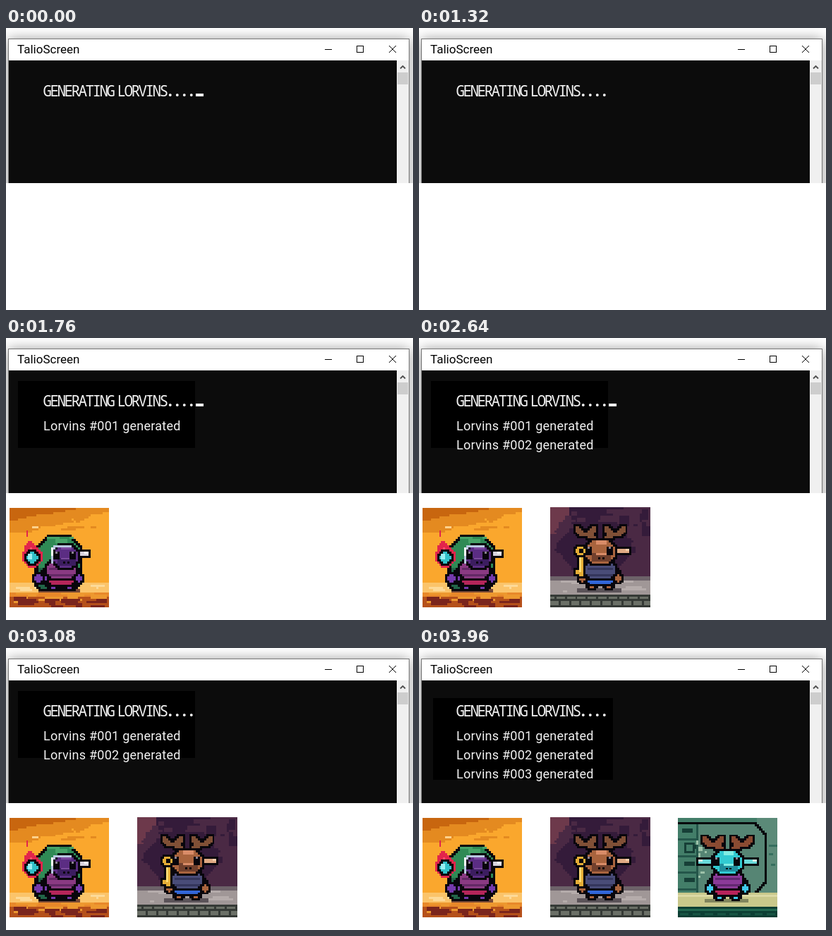
Animation, 577 px wide and 400 px high, one loop 4400 ms. Source, as an HTML page with a canvas:

```html
<!DOCTYPE html>
<html lang="en">
<head>
<meta charset="utf-8">
<title>Generator window</title>
<style>
  html, body { margin: 0; width: 100%; height: 100%; overflow: hidden; background: #fff; }
  #stage { position: relative; width: 577px; height: 400px; overflow: hidden; }
  #view { position: absolute; inset: 0 0 180px 0; overflow: hidden; }
  #win { position: absolute; left: 3px; top: 15px; width: 567px; height: 260px;
         border: 1px solid #777; background: #fff; box-shadow: 0 1px 17px rgba(0,0,0,.42); }
  svg { position: absolute; left: 0; top: 0; }
  canvas { position: absolute; top: 241px; width: 141px; height: 141px; image-rendering: pixelated; }
  #desert { left: 5px; }
  #cave { left: 186px; top: 240px; width: 142px; height: 142px; }
  #lab { left: 367px; }
  text { font-family: Roboto, "Liberation Sans", sans-serif; white-space: pre; }
  .head { font: 21px "Noto Sans Mono", "DejaVu Sans Mono", monospace;
          letter-spacing: -2.6px; word-spacing: -5px; }
  .dots { font-weight: 700; }
  .line { font-size: 18px; letter-spacing: .25px; }
  .off { visibility: hidden; }
</style>
</head>
<body>
<div id="stage">
  <div id="view">
    <div id="win"></div>
    <svg width="577" height="220" viewBox="0 0 577 220">
      <text x="16" y="36" font-size="17">TalioScreen</text>
      <path d="M452 30.5h10M497.5 25.5h9v9h-9z" fill="none" stroke="#000" shape-rendering="crispEdges"/>
      <path d="M543 25l10 10M553 25l-10 10" stroke="#000"/>
      <rect x="4" y="46" width="550" height="174" fill="#0c0c0c"/>
      <rect x="554" y="46" width="17" height="174" fill="#f0f0f0"/>
      <rect x="555" y="63" width="15" height="17" fill="#cdcdcd"/>
      <path d="M559 57.5l3.5-3.5 3.5 3.5" fill="none" stroke="#505050" stroke-width="1.8"/>
      <rect data-on="4-7" x="17" y="61" width="251" height="95"/>
      <path data-on="8-8" d="M17 61h251v42h2v88H12v-88h5z"/>
      <rect data-on="9-9" x="20" y="71" width="255" height="116"/>
      <g fill="#f2f2f2">
        <text class="head" x="52.5" y="97">GENERATING LORVINS</text>
        <text class="head dots" x="226.5" y="97">....</text>
        <text class="line" data-on="4-9" x="53" y="131">Lorvins #001 generated</text>
        <text class="line" data-on="6-9" x="53" y="158">Lorvins #002 generated</text>
        <text class="line" data-on="8-9" x="53" y="185">Lorvins #003 generated</text>
        <rect id="cursor" x="269" y="93" width="11" height="4" fill="#fff"/>
      </g>
    </svg>
  </div>
  <canvas id="desert" data-on="4-9"></canvas>
  <canvas id="cave" data-on="6-9"></canvas>
  <canvas id="lab" data-on="8-9"></canvas>
</div>
<script>
const INK = '#08060c', SIZE = 48;
const SIDES = [-1, 1];

function painter(id, seed) {
  const canvas = document.getElementById(id);
  canvas.width = canvas.height = SIZE;
  const g = canvas.getContext('2d');
  const rnd = n => (seed = seed * 16807 % 2147483647) / 2147483647 * n;

  const box = (color, x, y, w, h) => {
    g.fillStyle = color;
    g.fillRect(Math.round(x), Math.round(y), Math.round(w), Math.round(h));
  };
  const band = (color, y, h) => box(color, 0, y, SIZE, h);
  const round = (color, x, y, w, h, r) => {
    for (let i = 0; i < h; i++) {
      const cut = Math.max(0, r - i, r - (h - 1 - i));
      box(color, x + cut, y + i, w - 2 * cut, 1);
    }
  };
  const blob = (color, x, y, w, h, r = 2, edge = INK) => {
    round(edge, x, y, w, h, r);
    round(color, x + 1, y + 1, w - 2, h - 2, r);
  };
  // A square brush pulled along key points.
  const stroke = (color, size, points) => {
    for (let i = 1; i < points.length; i++) {
      const [x, y] = points[i - 1], [u, v] = points[i];
      for (let k = 0; k <= 1; k += 1 / 16)
        box(color, x + (u - x) * k - size / 2, y + (v - y) * k - size / 2, size, size);
    }
  };
  const outlined = (color, ...paths) => {
    for (const path of paths) stroke(INK, 4, path);
    for (const path of paths) stroke(color, 2, path);
  };
  const specks = (color, n, x, y, w, h, len = 4, tall = 1) => {
    while (n-- > 0) {
      const l = 1 + rnd(len), t = 1 + rnd(tall - 1);
      box(color, x + rnd(w - l), y + rnd(h - t), l, t);
    }
  };
  return { box, band, blob, stroke, outlined, specks, rnd };
}

function antlers(p, color, cx) {
  for (const s of SIDES) {
    const at = (d, y) => [cx + s * d, y];
    p.outlined(color, [at(3, 16), at(5, 13), at(9, 13), at(11, 10)], [at(5, 13), at(3, 10)]);
  }
}

function spike(p, color, tip, x, y, length) {
  p.outlined(color, [[x, y], [x + length, y]]);
  p.box(tip, x + length - 1, y - 1, 2, 1);
}

function body(p, { shirt, fold, pants, hand }, cx) {
  for (const s of SIDES) {
    p.blob(shirt, cx + s * 7 - 3, 28, 6, 7);
    p.blob(hand, cx + s * 8.5 - 2.5, 31, 5, 6, 1);
    p.blob(hand, cx + s * 4 - 3, 35, 6, 5, 1);
  }
  p.blob(pants, cx - 7, 32, 14, 6, 1);
  p.blob(shirt, cx - 8, 25, 16, 10, 2);
  for (let y = 29; y < 34; y += 3) p.box(fold, cx - 6, y, 12, 1);
}

function head(p, { skin, light, dark }, cx, y, width) {
  p.blob(skin, cx - width / 2, y, width, 13, 3);
  p.box(light, cx - 2, y + 1, 5, 2);
  p.box(dark, cx - 4, y + 7, 9, 4);
  p.box(light, cx - 2, y + 7, 5, 1);
  for (const s of SIDES) {
    const x = cx + s * (width / 2 - 3) - 1;
    p.box(INK, x - 1, y + 4, 3, 4);
    p.box('#8b8290', x, y + 4, 1, 1);
    p.box(INK, cx + s, y + 9, 1, 1);
  }
}

function drawDesert() {
  const p = painter('desert', 71);
  const look = { skin: '#5b2d83', light: '#7c4a9e', dark: '#3c1d60', shirt: '#8a3a82',
                 fold: '#632965', pants: '#b5255a', hand: '#7439ac' };
  p.band('#faa72d', 0, SIZE);
  for (let y = 0; y < 12; y++) {
    p.box('#e48a20', 0, y, 48 - y * 3.8 + p.rnd(6), 1);
    p.box('#c8660f', 0, y, 30 - y * 6 + p.rnd(5), 1);
  }
  p.specks('#e48a20', 9, 18, 3, 28, 8, 7);
  p.band('#fbc46a', 36, 5);
  p.specks('#fdda98', 9, 0, 37, 48, 3, 7);
  p.band('#e8882a', 41, 2);
  p.band('#b5501a', 43, 5);
  p.specks('#ed982f', 20, 0, 41, 48, 5, 6, 2);
  p.specks('#7a241c', 22, 0, 43, 48, 5, 6, 2);
  p.box('#7a4a35', 14, 39, 20, 2);

  p.blob('#226548', 12, 25, 22, 15, 2);
  p.blob('#2f8a55', 13, 13, 22, 26, 5);
  p.box('#226548', 14, 29, 7, 8);
  p.specks('#48a468', 5, 17, 14, 14, 4, 7);
  spike(p, '#d9d5df', '#fff', 33, 22, 4);
  body(p, look, 25);
  p.blob(look.hand, 11, 31, 6, 6, 1);
  head(p, look, 27, 17, 14);
  p.stroke('#b8c7df', 1, [[20.5, 26.5], [20.5, 19.5], [22.5, 18.5], [29.5, 18.5]]);
  p.box('#fff', 20, 19, 1, 4);

  p.blob('#fa536b', 6, 18, 10, 11, 3, '#e2254b');
  p.stroke('#e2254b', 2, [[8, 19], [10, 17], [12, 19]]);
  p.box('#e2254b', 8, 11, 1, 3);
  p.specks('#ffd18b', 3, 8, 7, 7, 9, 1);
  p.blob('#32bfc8', 7, 20, 8, 8, 2);
  p.box('#9beef0', 9, 22, 2, 3);
}

function drawCave() {
  const p = painter('cave', 229);
  const look = { skin: '#a9643e', light: '#d98c68', dark: '#71402d', shirt: '#494c78',
                 fold: '#34365c', pants: '#3266d8', hand: '#a9643e' };
  p.band('#341b3a', 0, SIZE);
  for (let y = 0; y < 33; y++) {
    const edge = 6 + 4 * Math.sin(y / 4);
    p.box('#4a2944', 0, y, edge + p.rnd(2), 1);
    p.box('#4a2944', 41 - edge + p.rnd(2), y, SIZE, 1);
    p.box('#6d394b', 0, y, 9 - y / 1.5 + p.rnd(2), 1);
  }
  p.specks('#4a2944', 12, 9, 0, 32, 9, 6, 4);
  p.specks('#341b3a', 10, 32, 0, 16, 32, 4, 5);
  p.band('#6d6269', 33, 2);
  p.band('#a09797', 35, 7);
  p.specks('#b5acab', 10, 0, 35, 48, 6, 8);
  p.band('#353a36', 42, 6);
  for (let x = -2; x < SIZE; x += 5) {
    p.box('#6b7067', x, 43, 4, 1);
    p.box('#6b7067', x + 2, 45, 4, 2);
  }
  p.box('#5b5359', 13, 39, 21, 2);

  spike(p, '#dfaa84', '#f2cfad', 32, 21, 5);
  body(p, look, 24);
  antlers(p, '#805036', 24);
  head(p, look, 24, 15, 16);
  const gold = '#e5ad36';
  p.outlined(gold, [[15, 22], [15, 32]], [[13, 31], [15, 31]]);
  p.blob(gold, 11, 18, 7, 6, 1);
  p.box(INK, 14, 20, 2, 2);
  p.box('#ffdb73', 14, 24, 1, 7);
}

function drawLab() {
  const p = painter('lab', 97);
  const look = { skin: '#32cbd2', light: '#80eee4', dark: '#208f9e', shirt: '#8b3a98',
                 fold: '#622871', pants: '#b7235b', hand: '#40c9ec' };
  p.band('#5b8a78', 0, SIZE);
  p.box('#437e69', 0, 0, 38, 3);
  p.blob('#568574', -5, 2, 48, 35, 5);
  p.box('#437e69', 0, 3, 10, 33);
  p.box('#24564a', 9, 3, 1, 33);
  for (let y = 5; y < 36; y += 8) {
    p.box('#173f37', 2 + p.rnd(3), y, 5, 2);
    p.box('#24564a', 0, y + 5, 9, 1);
  }
  p.blob('#437e69', 3, 12, 5, 5, 0, '#173f37');
  p.specks('#9dc2a9', 7, 9, 5, 5, 26, 1, 2);
  p.specks('#356e5e', 4, 44, 12, 4, 13, 3);
  p.band('#c9c88b', 36, 7);
  p.band('#dcd9a4', 37, 1);
  p.band('#0c3f34', 43, 5);
  p.band('#226951', 44, 1);
  for (let x = 1; x < SIZE; x += 6) p.box('#165443', x, 46, 4, 1);
  p.box('#80855d', 13, 39, 21, 2);

  for (const s of SIDES) spike(p, '#69d9d9', '#d8eee6', 24 + s * 8, 21, s * 5);
  body(p, look, 24);
  antlers(p, '#8a4b32', 24);
  head(p, look, 24, 15, 16);
}

drawDesert();
drawCave();
drawLab();

const STEP = 440, LOOP = 4400;
const cursor = document.getElementById('cursor');
const parts = [...document.querySelectorAll('[data-on]')].map(el => {
  const [from, to] = el.dataset.on.split('-').map(Number);
  return { el, from, to };
});

function show() {
  const step = Math.floor(performance.now() % LOOP / STEP);
  cursor.classList.toggle('off', step % 2 === 1);
  for (const { el, from, to } of parts) el.classList.toggle('off', step < from || step > to);
  requestAnimationFrame(show);
}
show();
</script>
</body>
</html>
```
